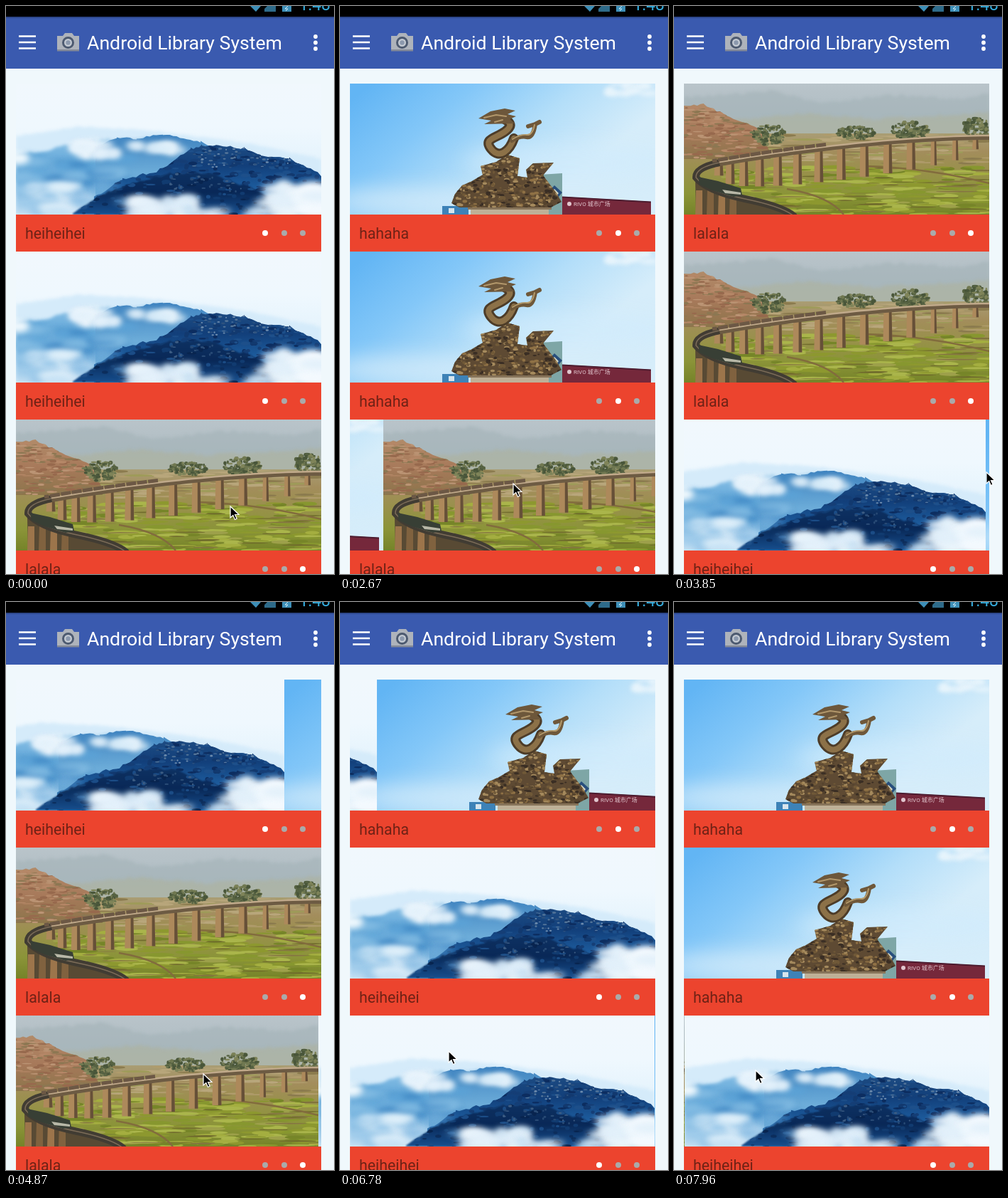
Animation of 462 by 798 pixels, one loop 8000 ms. Source, as an HTML page with a canvas:

```html
<!DOCTYPE html>
<html lang="en">
<head>
<meta charset="utf-8">
<title>Android Library System</title>
<style>
  html, body { margin: 0; width: 100%; height: 100%; overflow: hidden; background: #f0f8fc; }
  #stage { position: absolute; left: 0; top: 0; width: 462px; height: 798px; overflow: hidden;
    background: #f0f8fc; font-family: Roboto, sans-serif; }
  #chrome { position: absolute; left: 0; top: 0; }
  #clock { position: absolute; right: 5px; top: -14px; font-size: 23px; line-height: 26px; color: #35aee0; }
  #title { position: absolute; left: 114px; top: 32px; font-size: 26.67px; line-height: 41px;
    color: #fff; white-space: nowrap; }
  .card { position: absolute; left: 14px; width: 430px; height: 236px; background: #ec442e; }
  .card canvas { display: block; }
  .label { position: absolute; left: 13px; top: 184px; font-size: 21.33px; line-height: 53px; color: #6f2216; }
  .dot { position: absolute; top: 206px; width: 8px; height: 8px; border-radius: 50%; background: #aaa; }
  #cursor { position: absolute; left: 0; top: 0; overflow: visible; }
</style>
</head>
<body>
<div id="stage">
  <svg id="chrome" width="462" height="88">
    <rect width="462" height="15" fill="#000"/>
    <rect y="15" width="462" height="73" fill="#3a5aaf"/>
    <rect y="15" width="462" height="2" fill="#2d478c"/>
    <g fill="#3d8fb8">
      <path d="M344 0h15l-7 8z"/>
      <path d="M364 8v-4l4-4h12v8z" opacity=".75"/>
      <path d="M389 0h13v8h-13z"/>
    </g>
    <path d="M397 0l-4 4h4l-3 3" stroke="#cfeaf5" fill="none"/>
    <path d="M18 42.500h24M18 51h24M18 59.500h24" stroke="#fff" stroke-width="2.600"/>
    <path d="M436 43v0M436 51.500v0M436 60v0" stroke="#fff" stroke-width="5.800" stroke-linecap="round"/>
    <path d="M72 42h8l3-4h10l3 4h7v21H72z" fill="#aeb3bb"/>
    <path d="M72 61h31v2.500H72z" fill="#858b98"/>
    <circle cx="87.500" cy="51.500" r="7" fill="#c5cbd3" stroke="#4d5a70" stroke-width="3"/>
    <circle cx="87.500" cy="51.500" r="3.200" fill="#8b98ad"/>
  </svg>
  <div id="clock">1:48</div>
  <div id="title">Android Library System</div>
  <svg id="cursor" width="14" height="20">
    <path d="M0 0v16l3.800-3.500 2.600 6 2.700-1.200-2.600-5.800H12z" fill="#000" stroke="#fff" stroke-width="1.200"/>
  </svg>
</div>
<script>
const W = 430, H = 184, LOOP = 8000, STEP = 147.3;
const stage = document.getElementById('stage');
const cursor = document.getElementById('cursor');

let seed = 7;
const rnd = (a = 0, b = 1) => {
  seed = (seed * 16807) % 2147483647;
  return a + (b - a) * seed / 2147483647;
};
const pick = list => list[Math.floor(rnd(0, list.length))];

function canvas() {
  const c = document.createElement('canvas');
  c.width = W;
  c.height = H;
  return c;
}

function picture(paint) {
  const c = canvas();
  paint(c.getContext('2d'));
  return c;
}

function wash(g, y0, y1, colors, x0 = 0, x1 = 0) {
  const grad = g.createLinearGradient(x0, y0, x1, y1);
  colors.forEach((c, i) => grad.addColorStop(i / (colors.length - 1), c));
  return grad;
}

function shape(g, path, fill) {
  g.fillStyle = fill;
  g.fill(new Path2D(path));
}

function line(g, path, color, width) {
  g.strokeStyle = color;
  g.lineWidth = width;
  g.stroke(new Path2D(path));
}

function oval(g, x, y, rx, ry, fill) {
  g.fillStyle = fill;
  g.beginPath();
  g.ellipse(x, y, rx, ry, 0, 0, 7);
  g.fill();
}

function soft(g, blur, draw) {
  g.save();
  g.filter = `blur(${blur}px)`;
  draw();
  g.restore();
}

// A rough skyline through a few points, closed along the bottom
function skyline(points, rough) {
  let path = `M${points[0][0]} ${H}`;
  points.slice(1).forEach(([x, y], i) => {
    const [px, py] = points[i], n = Math.ceil((x - px) / 5);
    for (let j = 0; j <= n; j++) {
      path += `L${px + (x - px) * j / n} ${py + (y - py) * j / n + rnd(-rough, rough)}`;
    }
  });
  return path + `V${H}z`;
}

// Seeded small ovals in a box, kept inside a path when one is given
function scatter(g, n, [x0, y0, x1, y1], rx, ry, colors, clip) {
  g.save();
  if (clip) g.clip(new Path2D(clip));
  for (let i = 0; i < n; i++) {
    oval(g, rnd(x0, x1), rnd(y0, y1), rnd(rx / 3, rx), rnd(ry / 3, ry), pick(colors));
  }
  g.restore();
}

function mountains(g) {
  g.fillStyle = wash(g, 0, H, ['#f1f8fd', '#eff8fe', '#e2f2fc', '#d9edfa']);
  g.fillRect(0, 0, W, H);
  soft(g, 2, () => {
    shape(g, skyline([[0, 74], [90, 60], [190, 66], [330, 84], [430, 106]], 1), '#d5ebfa');
    shape(g, skyline([[0, 102], [60, 90], [110, 80], [210, 76], [300, 102]], 2),
      wash(g, 75, H, ['#8fc4e8', '#63a8d9', '#7fb9e2', '#c2dff3']));
  });
  shape(g, skyline([[112, 88], [142, 76], [170, 77], [207, 71], [260, 82], [300, 100]], 1.5),
    wash(g, 70, 125, ['#3d82bf', '#6cacd9']));
  soft(g, 4, () => {
    scatter(g, 22, [0, 100, 150, 140], 28, 7, ['#5ba3d7', '#428ac6', '#82bbe2']);
    scatter(g, 16, [85, 86, 145, 101], 17, 8, ['#f4fafe', '#e3f1fb']);
    scatter(g, 14, [165, 86, 225, 96], 18, 6, ['#eaf5fc', '#d8ecf9']);
    scatter(g, 18, [0, 140, 100, 184], 32, 9, ['#c7e2f5', '#9dcaea', '#e0f0fa']);
    oval(g, 2, 105, 17, 9, '#eff8fd');
  });
  const back = skyline([[110, 160], [150, 134], [198, 124], [246, 92], [262, 86], [322, 91], [345, 102], [385, 104], [430, 129]], 2);
  soft(g, .6, () => shape(g, back, wash(g, 85, 175, ['#1d4b82', '#123f7a', '#1c5a9b', '#4c93cd'])));
  scatter(g, 280, [130, 85, 430, 150], 7, 3, ['#0c2d60', '#12396f', '#1d4f8a', '#153e76'], back);
  scatter(g, 110, [248, 86, 420, 118], 3, 1.4, ['#547599', '#2d527f', '#6d8caf'], back);
  const front = skyline([[80, 182], [115, 158], [155, 143], [218, 126], [270, 125], [330, 146], [375, 165], [385, 184]], 2);
  soft(g, 1, () => shape(g, front, wash(g, 122, H, ['#0e3263', '#092857', '#174f8e'])));
  scatter(g, 170, [95, 122, 380, 184], 7, 3, ['#08244f', '#113b70', '#1b4c86', '#0c2d5c'], front);
  scatter(g, 45, [215, 124, 320, 152], 3, 2, ['#3c5c83', '#284a75'], front);
  soft(g, 5, () => {
    scatter(g, 26, [165, 163, 250, 184], 24, 9, ['#f1f8fd', '#e4f1fb', '#d2e7f7']);
    scatter(g, 26, [360, 146, 430, 184], 30, 13, ['#f3f9fe', '#f1f9fe', '#e2f0fa']);
    scatter(g, 14, [230, 176, 390, 188], 28, 6, ['#c4dff3', '#ecf6fc']);
    scatter(g, 12, [80, 140, 150, 180], 18, 5, ['rgba(110,170,220,.45)']);
  });
}

function statue(g) {
  g.fillStyle = wash(g, 0, 220, ['#62b5f4', '#83c7f8', '#b3def9', '#d6edfa'], 30, 210);
  g.fillRect(0, 0, W, H);
  soft(g, 14, () => {
    oval(g, 310, 110, 150, 24, 'rgba(208,236,252,.7)');
    oval(g, 90, 165, 120, 18, 'rgba(212,236,250,.8)');
  });
  soft(g, 3, () => scatter(g, 12, [365, 0, 430, 14], 18, 5, ['#e9f5fc']));
  shape(g, 'M130 172h37v12h-37z', '#3d82b7');
  shape(g, 'M139 175h8v7h-8z', '#d6e5ed');
  shape(g, 'M252 129L299 126V184H252z', '#7ea6a6');
  shape(g, 'M288 143l11 10-11 13-10-12z', '#284f7d');
  shape(g, 'M288 148l6 6-6 7-6-7z', '#d8d8c4');
  shape(g, 'M299 159L424 166V184H299z', '#75283b');
  line(g, 'M299 159.500L424 166.500', '#4c1c2f', 2);
  oval(g, 309, 169, 3, 3, '#e1c6ce');
  g.font = '8px Roboto, "Noto Sans CJK SC", sans-serif';
  g.fillText('RIVO 城市广场', 315, 172);
  shape(g, 'M170 174h110v10h-110z', '#beb097');
  shape(g, 'M166 174h118v3h-118z', '#87745a');

  g.lineCap = g.lineJoin = 'round';
  const pile = 'M143 168L148 155 158 143 170 138 187 128 184 116 206 110 222 100 239 105 236 130 250 132 248 121 258 112 287 111 272 129 291 154 298 166 283 174H154z';
  shape(g, pile, '#5e4a33');
  scatter(g, 520, [143, 100, 298, 175], 4, 2.5, ['#3a2e24', '#8f7145', '#a58a5d', '#55432d', '#705938'], pile);
  const body = 'M207 45C224 52 232 57 219 67S187 77 199 92 225 94 231 77';
  line(g, body, '#4d3c28', 14);
  line(g, body, '#8c7148', 8);
  line(g, 'M228 80Q240 73 249 75T261 57l6-3M261 57l-10 3', '#6f583a', 6);
  line(g, 'M229 78Q241 71 249 72T260 58', '#b49a6b', 2);
  shape(g, 'M181 49L198 39 218 35 233 38 222 43 234 46 225 50 232 56 189 57 199 52z', '#6d573b');
  line(g, 'M189 48l17-4 14 2M204 54l11-3', '#b2976b', 2);
}

const deckY = x => 74 + 46 * (1 - x / W) ** 1.74;

function deckPath(from, dy) {
  let path = `M${from} ${deckY(from) + dy}`;
  for (let x = from; x >= 40; x -= 10) path += `L${x} ${deckY(x) + dy}`;
  return path;
}

function bridge(g) {
  g.fillStyle = wash(g, 0, 85, ['#b9c4ca', '#b0bdc3', '#b9bdb4']);
  g.fillRect(0, 0, W, H);
  soft(g, 2, () => {
    shape(g, skyline([[0, 20], [130, 10], [190, 28], [290, 16], [390, 22], [430, 14]], 2), 'rgba(163,178,184,.6)');
    shape(g, skyline([[70, 52], [170, 42], [270, 50], [430, 40]], 2), 'rgba(173,178,161,.7)');
  });
  g.fillStyle = wash(g, 66, H, ['#aaa078', '#a38d5c', '#98914a', '#8b9438', '#758329']);
  g.fillRect(0, 70, W, H);
  scatter(g, 130, [100, 72, W, 112], 22, 2, ['#b09c6c', '#8b7b4e', '#9e9b59', '#b8a67b']);
  const cliff = skyline([[0, 31], [28, 29], [60, 45], [104, 62], [122, 96]], 1.5);
  g.save();
  g.clip(new Path2D('M0 0H430V106H0z'));
  shape(g, cliff, wash(g, 30, 106, ['#b18a68', '#a7795a', '#8c754b']));
  scatter(g, 200, [0, 34, 112, 106], 9, 2, ['#b58767', '#97694d', '#bb9474', '#8c7752'], cliff);
  g.restore();
  scatter(g, 240, [60, 116, W, H], 24, 3, ['#a4ae40', '#8d982f', '#768528', '#9da04a', '#87972f', '#aab54b']);
  scatter(g, 45, [100, 118, W, 182], 30, 1, ['#716c2d', '#857443']);
  line(g, 'M255 116Q340 118 430 140M145 148Q205 158 225 184', '#826c3d', 2.5);
  // Tree clumps: centre, half width, half height
  for (const [x, y, rx, ry] of [[120, 72, 25, 14], [243, 69, 27, 9], [318, 66, 26, 13], [411, 62, 19, 14]]) {
    for (let i = 0; i < 110; i++) {
      const a = rnd(0, 6.28), r = Math.sqrt(rnd());
      oval(g, x + rx * r * Math.cos(a), y + ry * r * Math.sin(a), rnd(1, 4), rnd(1, 3), pick(['#707851', '#566242', '#7f8459', '#49563a']));
    }
  }
  let x = 49;
  for (let i = 0; i < 14; i++) {
    const top = deckY(x), bottom = top + 18 + 30 * Math.sqrt(Math.abs(Math.sin(Math.PI * i / 13))), w = i > 10 ? 3.5 : 5.5;
    shape(g, `M${x - w} ${top}h${2 * w}L${x + w + 1} ${bottom}H${x - w - 1}z`, '#ad895b');
    shape(g, `M${x + w / 3} ${top}H${x + w}l1 ${bottom - top}H${x + w / 3}z`, '#665038');
    x += 16 + 17 * Math.sin(i * .193);
  }
  shape(g, 'M16 138L90 160 154 184H17z', '#584a34');
  for (let i = 0; i < 4; i++) shape(g, `M${17 + i * 16} 150h9v34h-10z`, i % 2 ? '#80623f' : '#9c754b');
  line(g, deckPath(W, 2), '#6d5b43', 6);
  line(g, deckPath(W, -1), '#c0a98a', 2.5);
  const loop = `M50 ${deckY(50)}Q16 118 17 132Q32 151 86 162T156 187`;
  line(g, loop, '#413c33', 10);
  line(g, loop, '#7c6c58', 1.5);
  g.setLineDash([14, 1.5]);
  line(g, deckPath(200, -4), '#6c5845', 5);
  g.setLineDash([]);
  shape(g, 'M20 131L48 137 80 147 82 157 70 159 40 150 22 142z', '#383f35');
  shape(g, 'M54 149L80 153V156L58 154z', '#b8b8a7');
}

const pics = [mountains, statue, bridge].map(picture);
const names = ['heiheihei', 'hahaha', 'lalala'];
const mod3 = n => ((n % 3) + 3) % 3;

function makeCard(top) {
  const el = document.createElement('div');
  el.className = 'card';
  el.style.top = top + 'px';
  const view = canvas(), label = document.createElement('div');
  label.className = 'label';
  el.append(view, label);
  const dots = names.map((_, i) => {
    const d = document.createElement('div');
    d.className = 'dot';
    d.style.left = 347 + 26.5 * i + 'px';
    el.append(d);
    return d;
  });
  stage.insertBefore(el, cursor);
  const g = view.getContext('2d');
  return (pos, page) => {
    const base = Math.floor(pos), x = Math.round((base - pos) * W);
    g.drawImage(pics[mod3(base)], x, 0);
    g.drawImage(pics[mod3(base + 1)], x + W, 0);
    label.textContent = names[page];
    dots.forEach((d, i) => { d.style.background = i === page ? '#fff' : '#aaa'; });
  };
}
const cards = [109, 345, 581].map(makeCard);

// Turns a page every period and rewinds from the last to the first
function autoPage(t, first, period) {
  const n = Math.floor((t - first) / period);
  if (n < 0) return [0, 0];
  const from = n % 3, to = (n + 1) % 3;
  const k = Math.min(1, (t - first - n * period) / (100 + 100 * Math.abs(to - from)));
  return [from + (to - from) * (1 - (1 - k) ** 5), to];
}

// Hand swipes: each moves one page over four steps, the last one forward
const backSwipes = [17.18, 22.26, 29.22, 34.7, 42.1, 46.1], forwardSwipe = 50.1;
function handPage(step) {
  const turned = start => {
    const k = Math.max(0, Math.min(1, (step - start) / 4));
    return k * k * (3 - 2 * k);
  };
  return backSwipes.reduce((pos, s) => pos - turned(s), 2 + turned(forwardSwipe));
}

// Pointer stops: step, x, y
const stops = [[0, 316, 703], [2, 189, 702], [5, 189, 702], [10, 265, 690], [13, 72, 679], [17, 41, 677],
  [18, 244, 671], [26, 440, 655], [33, 278, 663], [38, 370, 660], [46, 153, 631], [54, 115, 658]];
function pointerAt(step) {
  const i = Math.max(1, stops.findIndex(s => s[0] >= step));
  const [s0, x0, y0] = stops[i - 1], [s1, x1, y1] = stops[i], k = (step - s0) / (s1 - s0);
  return [x0 + (x1 - x0) * k, y0 + (y1 - y0) * k].map(Math.round);
}

function render(step) {
  const t = step * STEP, pos = handPage(step), [x, y] = pointerAt(step);
  cards[0](...autoPage(t, 799, 1966.6));
  cards[1](...autoPage(t, 1310, 1962));
  cards[2](pos, mod3(Math.round(pos)));
  cursor.style.transform = `translate(${x}px, ${y}px)`;
}

let shown = -1;
const start = performance.now();
function tick() {
  const step = Math.floor(((performance.now() - start) % LOOP) / STEP);
  if (step !== shown) render(shown = step);
  requestAnimationFrame(tick);
}
tick();
</script>
</body>
</html>
```
